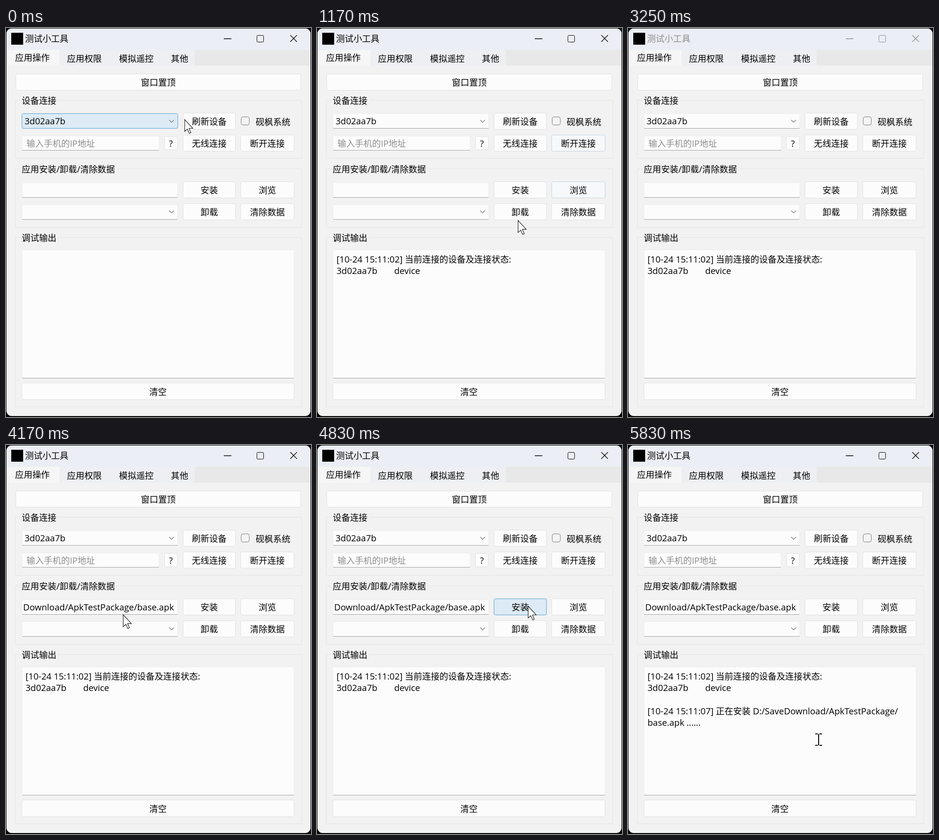
These frames come from a looping animation (640 px wide and 816 px high, 8000 ms). An HTML page with a canvas:

```html
<!DOCTYPE html>
<html lang="zh-CN">
<head>
<meta charset="utf-8">
<title>测试小工具</title>
<style>
  html, body { margin: 0; width: 100%; height: 100%; overflow: hidden; background: #000; }
  canvas { display: block; width: 640px; height: 816px; }
</style>
</head>
<body>
<canvas id="stage" width="640" height="816"></canvas>
<script>
const ctx = document.getElementById('stage').getContext('2d');
const LOOP = 8000;
const STEP = 1000 / 12;
const CJK = '18.2px "Noto Sans CJK SC", "Noto Sans CJK JP", sans-serif';
const LATIN = '18.5px "Open Sans", "Noto Sans", sans-serif';
const INK = '#000', MUTED = '#8c8c8c';
const PANEL = '#f2f2f2', FIELD = '#fcfcfc', EDGE = '#dfdfe2', LINE = '#e4e4e5', GRAY = '#a2a2a2';

// Moments when the state of the window changes
const LISTED = 490, LEAVE = 2410, BLUR = 3245, ENTER = 3325, DROP = 3580, FOCUS = 3660, INSTALL = 5080;

// Pointer key points: time, x, y
const OUT = [
  [-300, 300, 196], [0, 375, 192], [300, 425, 196], [830, 470, 168],
  [1000, 592, 285], [1170, 420, 405], [1330, 408, 388], [1700, 371, 380],
  [1830, 278, 368], [2333, 24, 380]
];
const BACK = [
  [3333, 50, 345], [3667, 225, 352], [4000, 245, 353], [4170, 247, 356],
  [4600, 430, 341], [4830, 443, 338], [5080, 443, 340],
  [5583, 421, 586], [5720, 392, 612], [5830, 400, 618]
];

// Smooth curve through timed points, tangents taken from the neighbours
function spline(t, keys) {
  const last = keys.length - 1;
  if (t <= keys[0][0]) return keys[0].slice(1);
  if (t >= keys[last][0]) return keys[last].slice(1);
  const i = keys.findIndex(k => k[0] > t) - 1;
  const a = keys[i], b = keys[i + 1];
  const span = b[0] - a[0], u = (t - a[0]) / span;
  const slope = (n, j) => {
    if (n === 0 || n === last) return 0;
    const p = keys[n - 1], q = keys[n + 1];
    return (q[j] - p[j]) / (q[0] - p[0]) * span;
  };
  const ease = u * u * (3 - 2 * u);
  return [1, 2].map(j => a[j] + (b[j] - a[j]) * ease
    + slope(i, j) * u * (1 - u) ** 2 - slope(i + 1, j) * u * u * (1 - u));
}

const pointerAt = t => spline(t, t < BLUR ? OUT : BACK);

function inside(t, x, y, w, h) {
  const [px, py] = pointerAt(t);
  return px >= x && px < x + w && py >= y && py < y + h;
}

// Highlight fades: share of recent moments spent over the box
function hover(t, ...rect) {
  let hits = 0;
  for (let d = 60; d <= 260; d += 40) hits += inside(t - d, ...rect);
  return Math.min(1, hits / 5);
}

function text(str, x, mid, color = INK, align = 'left') {
  const runs = str.match(/[\u3000-\u9fff]+|[^\u3000-\u9fff]+/g).map(s => {
    const font = /[\u3000-\u9fff]/.test(s) ? CJK : LATIN;
    ctx.font = font;
    return { s, font, w: ctx.measureText(s).width };
  });
  if (align === 'center') x -= runs.reduce((sum, r) => sum + r.w, 0) / 2;
  ctx.fillStyle = color;
  for (const r of runs) {
    ctx.font = r.font;
    ctx.fillText(r.s, x, mid + 7);
    x += r.w;
  }
}

function fill(color, x, y, w, h) {
  ctx.fillStyle = color;
  ctx.fillRect(x, y, w, h);
}

function box(x, y, w, h, color, stroke, r = 3) {
  ctx.beginPath();
  ctx.roundRect(x + .5, y + .5, w - 1, h - 1, r);
  if (color) { ctx.fillStyle = color; ctx.fill(); }
  ctx.strokeStyle = stroke;
  ctx.lineWidth = 1;
  ctx.stroke();
}

function path(points, color, width = 1) {
  ctx.beginPath();
  points.forEach(([x, y]) => ctx.lineTo(x, y));
  ctx.strokeStyle = color;
  ctx.lineWidth = width;
  ctx.stroke();
}

function tint(t, ...rect) {
  ctx.globalAlpha = hover(t, ...rect);
  box(...rect, '#dcebf5', '#5d9fce');
  ctx.globalAlpha = 1;
}

function button(t, label, x, y, w, h = 35) {
  box(x, y, w, h, FIELD, EDGE);
  tint(t, x, y, w, h);
  text(label, x + w / 2, y + h / 2 + .5, INK, 'center');
}

function field(x, y, w, h) {
  box(x, y, w, h, FIELD, '#ececec');
  path([[x + 1, y + h - .5], [x + w - 1, y + h - .5]], GRAY);
}

function chevron(y) {
  path([[342.5, y], [347.5, y + 5], [352.5, y]], '#777', 1.2);
}

function group(label, y, bottom, gap) {
  path([[30, y + .5], [19.5, y + .5], [19.5, bottom + .5], [620.5, bottom + .5],
    [620.5, y + .5], [gap, y + .5]], LINE);
  text(label, 33, y + 1);
}

function titleBar(active) {
  const color = active ? INK : MUTED;
  fill('#ebeef4', 0, 0, 640, 46);
  fill('#eeeff2', 0, 46, 396, 33);
  fill('#e8e8e9', 396, 46, 244, 33);
  fill('#f6f6f6', 2, 46, 110, 33);
  fill('#000', 11, 10, 25, 25);
  text('测试小工具', 40, 22, color);
  path([[457, 22.5], [473, 22.5]], color, 1.3);
  box(526, 15, 15, 15, null, color, 2);
  path([[596.5, 15], [610.5, 29]], color, 1.3);
  path([[610.5, 15], [596.5, 29]], color, 1.3);
  ['应用操作', '应用权限', '模拟遥控', '其他']
    .forEach((label, i) => text(label, 19 + 109 * i, i ? 64 : 62));
}

function devices(t) {
  group('设备连接', 151, 273, 110);
  field(33, 179, 328, 32);
  tint(t, 33, 179, 328, 32);
  chevron(193);
  text('3d02aa7b', 39, 195);
  button(t, '刷新设备', 371, 178, 111);
  box(493, 186, 18, 18, '#f4f4f4', '#777', 4);
  text('砚枫系统', 524, 197);
  field(33, 226, 289, 31);
  text('输入手机的IP地址', 43, 242, MUTED);
  button(t, '?', 332, 227, 28, 29);
  button(t, '无线连接', 371, 224, 111);
  button(t, '断开连接', 492, 224, 113);
}

function packages(t) {
  group('应用安装/卸载/清除数据', 295, 418, 235);
  field(33, 324, 328, 32);
  if (t >= DROP) text('Download/ApkTestPackage/base.apk', 36, 340);
  button(t, '安装', 371, 322, 111);
  button(t, '浏览', 492, 322, 113);
  field(33, 370, 328, 32);
  if (inside(t, 33, 366, 328, 36)) box(334, 371, 26, 30, '#f6f6f6', EDGE);
  chevron(383);
  button(t, '卸载', 371, 368, 111);
  button(t, '清除数据', 492, 368, 113);
}

function output(t) {
  group('调试输出', 439, 794, 110);
  field(33, 465, 572, 270);
  if (t >= LISTED) {
    text('[10-24 15:11:02] 当前连接的设备及连接状态:', 41, 485);
    text('3d02aa7b', 41, 509);
    text('device', 162, 509);
  }
  if (t >= INSTALL) {
    text('[10-24 15:11:07] 正在安装 D:/SaveDownload/ApkTestPackage/', 41, 558);
    text('base.apk ......', 41, 582);
  }
  button(t, '清空', 33, 744, 572, 36);
}

function arrow(x, y) {
  ctx.beginPath();
  [[0, 0], [0, 25], [5.5, 20], [9.5, 29], [13, 27.5], [9, 18.5], [17, 18.5]]
    .forEach(([dx, dy]) => ctx.lineTo(x + dx, y + dy));
  ctx.closePath();
  ctx.fillStyle = '#fff';
  ctx.fill();
  ctx.strokeStyle = '#222';
  ctx.lineWidth = 1.2;
  ctx.stroke();
}

function beam(x, y) {
  path([[x, y - 12], [x, y + 12]], INK, 2);
  for (const dy of [-12, 12]) {
    path([[x - 7, y + dy], [x - 2, y + dy]], INK, 2);
    path([[x + 2, y + dy], [x + 7, y + dy]], INK, 2);
  }
}

function pointer(t) {
  if (t >= LEAVE && t < ENTER) return;
  const [x, y] = pointerAt(t);
  (y > 465 ? beam : arrow)(x, y);
}

function draw(t) {
  fill('#000', 0, 0, 640, 816);
  ctx.save();
  ctx.beginPath();
  ctx.roundRect(1, 1, 638, 813, 11);
  ctx.clip();
  fill(PANEL, 0, 0, 640, 816);
  titleBar(t < BLUR || t >= FOCUS);
  button(t, '窗口置顶', 20, 96, 599);
  devices(t);
  packages(t);
  output(t);
  pointer(t);
  ctx.restore();
}

function frame(now) {
  const t = now % LOOP;
  draw(Math.floor((t + 5) / STEP) * STEP);
  requestAnimationFrame(frame);
}
requestAnimationFrame(frame);
</script>
</body>
</html>
```
